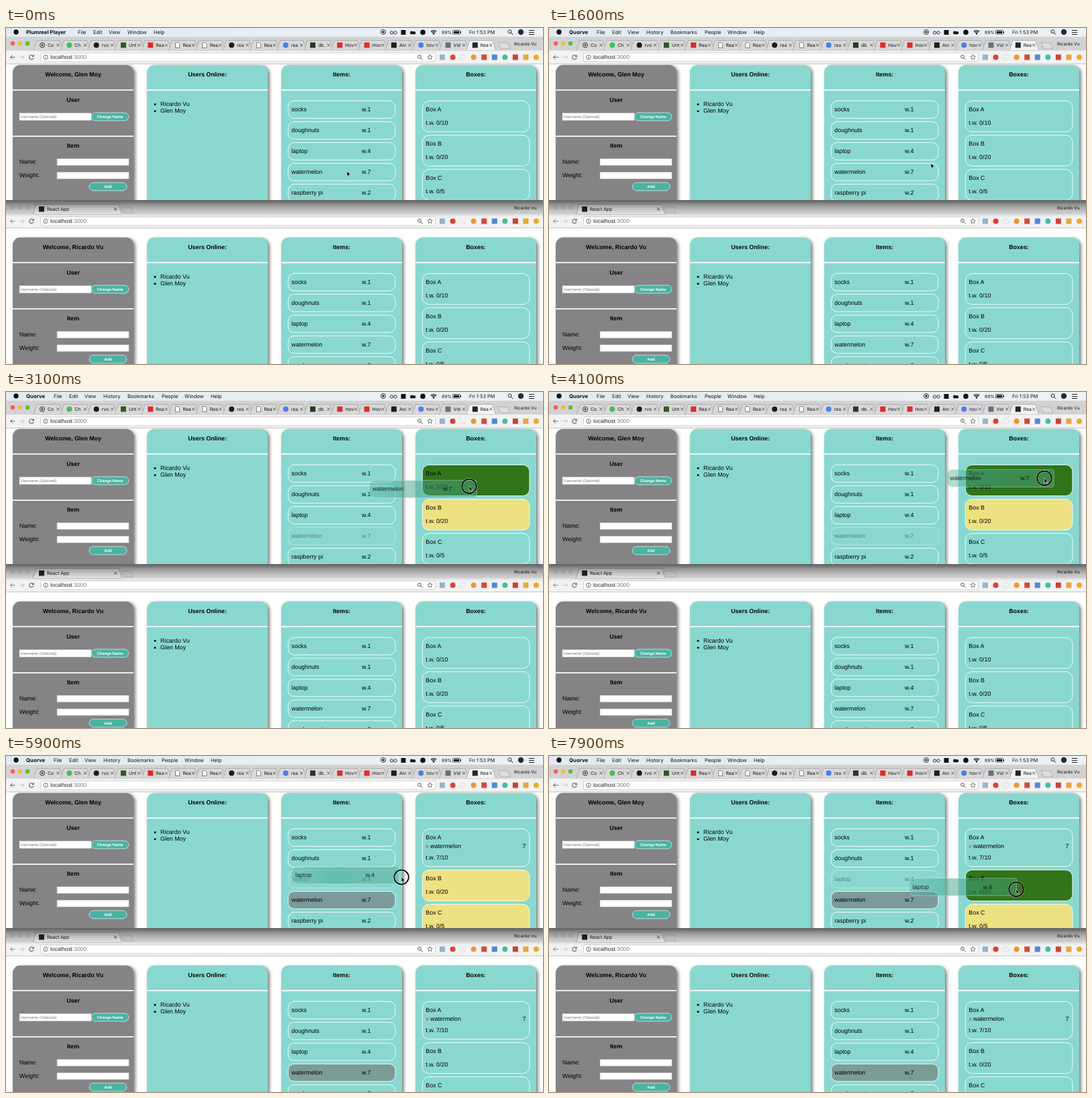
An HTML page with a canvas for the animation above (8000 ms loop, 800 by 500 pixels).

```html
<!DOCTYPE html>
<html lang="en">
<head>
<meta charset="utf-8">
<title>Boxes</title>
<style>
html, body { margin: 0; width: 100%; height: 100%; overflow: hidden; background: #fff; }
canvas { display: block; width: 800px; height: 500px; }
</style>
</head>
<body>
<canvas id="stage" width="800" height="500"></canvas>
<script>
const ctx = document.getElementById('stage').getContext('2d');
const LOOP = 8000;
const MENU_AT = 500;
const SANS = '"Liberation Sans", Arial, sans-serif';
const UI = 'Inter, Roboto, sans-serif';
const TEAL = '#89d8cf', GREY = '#858385', BUTTON = '#4bb3a4';
const YELLOW = '#ede181', GREEN = '#31741a', PACKED = '#7b9b98';
const ME = 'Glen Moy', OTHER = 'Ricardo Vu';
const items = [['socks', 1], ['doughnuts', 1], ['laptop', 4], ['watermelon', 7], ['raspberry pi', 2]];
const boxes = [['Box A', 10], ['Box B', 20], ['Box C', 5]];

// time, pointer x, y, dragged card offset x, y
const path = [
  [0, 508, 213, 0, 0], [700, 508, 213, 0, 0], [1600, 569, 201, 0, 0],
  [1850, 570, 211, 0, 0], [2500, 640, 156, 70, -54], [3100, 690, 140, 121, -70],
  [4100, 738, 128, 172, -86], [4700, 735, 130, 169, -84], [5500, 582, 187, 0, 0],
  [5700, 583, 187, 0, 0], [5900, 589, 180, 5.5, -6], [6500, 655, 196, 74, 9],
  [7000, 685, 202, 105.5, 15], [7900, 696, 198, 116.5, 11.5], [8000, 697, 198, 117.5, 11.5]
];
const drags = [{ item: 3, from: 1850, to: 4700 }, { item: 2, from: 5720, to: 8001 }];

function poseAt(t) {
  let i = 0;
  while (i < path.length - 2 && t >= path[i + 1][0]) i++;
  const a = path[i], b = path[i + 1];
  const k = (t - a[0]) / (b[0] - a[0]);
  const [x, y, dx, dy] = a.slice(1).map((v, n) => v + (b[n + 1] - v) * k);
  return { x, y, dx, dy };
}

// y is the middle of the line
function text(s, x, y, size = 8.89, color = '#000', o = {}) {
  ctx.font = `${o.weight || 400} ${size}px ${o.font || SANS}`;
  ctx.textRendering = 'geometricPrecision';
  ctx.textAlign = o.align || 'left';
  ctx.fillStyle = color;
  ctx.fillText(s, x, y + size * 0.35);
}
const bold = (s, x, y) => text(s, x, y, 8.89, '#000', { weight: 700, align: 'center' });
const ui = (s, x, y, size, weight = 400) => text(s, x, y, size, '#111', { font: UI, weight });

function rect(x, y, w, h, color) {
  ctx.fillStyle = color;
  ctx.fillRect(x, y, w, h);
}
function round(x, y, w, h, r, fill, stroke, width = 1) {
  ctx.beginPath();
  ctx.roundRect(x, y, w, h, r);
  if (fill) { ctx.fillStyle = fill; ctx.fill(); }
  if (stroke) { ctx.strokeStyle = stroke; ctx.lineWidth = width; ctx.stroke(); }
}
function dot(x, y, r, fill, stroke, width = 1) {
  ctx.beginPath();
  ctx.arc(x, y, r, 0, Math.PI * 2);
  if (fill) { ctx.fillStyle = fill; ctx.fill(); }
  if (stroke) { ctx.strokeStyle = stroke; ctx.lineWidth = width; ctx.stroke(); }
}
function poly(pts, fill, stroke, width = 1, close = true) {
  ctx.beginPath();
  pts.forEach(([x, y], i) => i ? ctx.lineTo(x, y) : ctx.moveTo(x, y));
  if (close) ctx.closePath();
  if (fill) { ctx.fillStyle = fill; ctx.fill(); }
  if (stroke) { ctx.strokeStyle = stroke; ctx.lineWidth = width; ctx.stroke(); }
}
const line = (pts, color, width = 1) => poly(pts, null, color, width, false);

function arc(x, y, r, a, b, color, width) {
  ctx.beginPath();
  ctx.arc(x, y, r, a, b);
  ctx.strokeStyle = color;
  ctx.lineWidth = width;
  ctx.stroke();
}
function gradient(x0, y0, x1, y1, stops) {
  const g = ctx.createLinearGradient(x0, y0, x1, y1);
  stops.forEach(([at, color]) => g.addColorStop(at, color));
  return g;
}
function cross(x, y, r = 2, color = '#444') {
  line([[x - r, y - r], [x + r, y + r]], color, 0.9);
  line([[x + r, y - r], [x - r, y + r]], color, 0.9);
}
function lens(x, y, r, color, width) {
  dot(x, y, r, null, color, width);
  line([[x + r * 0.7, y + r * 0.7], [x + r * 2, y + r * 2]], color, width);
}

function menuBar(t) {
  rect(0, 0, 800, 13, gradient(0, 0, 800, 0, [[0, '#e1eaf2'], [1, '#ecf1f5']]));
  dot(15, 6, 3.7, '#111');
  const early = t < MENU_AT;
  const labels = early
    ? [['File', 107], ['Edit', 130], ['View', 153], ['Window', 181], ['Help', 220]]
    : [['File', 71], ['Edit', 94], ['View', 117], ['History', 145], ['Bookmarks', 181],
       ['People', 232], ['Window', 266], ['Help', 305]];
  ui(early ? 'Plumreel Player' : 'Quorve', 30, 6.3, 7.8, 700);
  labels.forEach(([s, x]) => ui(s, x, 6.3, 7.5));

  dot(562, 6, 3.6, null, '#222', 0.9);
  rect(560.5, 4.5, 3, 3, '#222');
  dot(574.5, 7, 2.2, null, '#222', 0.9);
  dot(580, 7, 2.2, null, '#222', 0.9);
  rect(588.5, 3, 7, 7, '#111');
  dot(604.5, 7, 2.5, '#111');
  dot(608, 7.3, 2.2, '#111');
  dot(621, 6.4, 3.8, '#111');
  [2, 4, 6].forEach(r => arc(637, 9.5, r, -2.35, -0.79, '#111', 1.2));
  dot(637, 9.2, 0.9, '#111');
  ui('89%', 649, 6.3, 6.7);
  round(665.5, 3.5, 11, 5.5, 1, null, '#222', 0.8);
  rect(667, 4.8, 8, 3, '#111');
  rect(677, 5, 1, 2.5, '#111');
  ui('Fri 1:53 PM', 690, 6.3, 7.4);
  lens(750.5, 5.3, 2.5, '#222', 1);
  dot(767, 6, 4.2, '#26283f');
  [3, 6, 9].forEach(y => rect(779, y, 8, 1, '#222'));
}

function tabShape(x, w, y, fill) {
  poly([[x, y + 15], [x + 5, y], [x + w - 5, y], [x + w, y + 15]], fill, '#a5a5a5', 0.8);
}
function favicon(kind, x, y) {
  if (kind === 'page') {
    poly([[x - 3, y - 4], [x + 1, y - 4], [x + 3, y - 2], [x + 3, y + 4], [x - 3, y + 4]], '#fff', '#666', 0.8);
  } else if (kind === 'add') {
    dot(x, y, 3.6, null, '#222', 0.9);
    line([[x - 2, y], [x + 2, y]], '#222', 0.9);
    line([[x, y - 2], [x, y + 2]], '#222', 0.9);
  } else if (kind[0] === 'o') {
    dot(x, y, 4, kind.slice(1));
  } else {
    rect(x - 4, y - 4, 8, 8, kind);
  }
}
const tabs = [
  ['Co', 'add'], ['Ch', 'o#3fbf50'], ['rvo', 'o#1b1b1b'], ['Unt', '#2d5a20'], ['Rea', '#dd2c28'],
  ['Rea', 'page'], ['Rea', 'page'], ['rea', 'o#1b1b1b'], ['Rea', 'page'], ['rea', 'o#4a7fe8'],
  ['db.', '#263a20'], ['Hov', '#dd2c28'], ['Hov', '#dd2c28'], ['Ani', '#1d1d1d'], ['hov', 'o#4a7fe8'],
  ['Vid', '#5f7381'], ['Rea', '#20262b']
];
const addons = ['#8fb4cf', 'o#df3d35', '', 'o#e79834', '#d5483c', '#5287d6', 'o#43bda4', '#c94236', '#e9a53a', 'o#f0a62c'];

function toolbar(y, focused) {
  rect(0, y - 10, 800, 20, '#f2f2f2');
  rect(0, y + 9.5, 800, 0.8, '#b9b9b9');
  const dark = '#606060', pale = '#c2c2c2';
  const arrow = (x, d, c) => {
    line([[x - 3.5, y], [x + 3.5, y]], c, 1);
    line([[x + d * 0.5, y - 3], [x + d * 3.5, y], [x + d * 0.5, y + 3]], c, 1);
  };
  arrow(10, -1, focused ? dark : '#888');
  arrow(24, 1, pale);
  arc(38, y, 3.2, 0.3, 5.4, dark, 1.1);
  poly([[41.7, y - 4], [41.7, y - 0.5], [38.3, y - 0.5]], dark);
  round(51.5, y - 6.5, 588, 13, 2, '#fff', '#c4c4c4', 0.8);
  dot(59, y, 3.3, null, '#555', 0.8);
  rect(58.5, y - 0.5, 1, 2.3, '#555');
  rect(58.5, y - 2, 1, 1, '#555');
  text('localhost', 66, y, 8.35, '#222');
  text(':3000', 99, y, 8.35, '#777');
  lens(616, y - 0.8, 2.4, '#555', 1);
  const star = Array.from({ length: 10 }, (_, i) => {
    const a = i * Math.PI / 5 - Math.PI / 2, r = i % 2 ? 1.8 : 4;
    return [631.5 + r * Math.cos(a), y + r * Math.sin(a)];
  });
  poly(star, null, '#555', 0.8);
  addons.forEach((kind, i) => {
    const x = 650 + i * 15.55;
    if (kind) favicon(kind, x, y);
    else round(x - 4, y - 3, 8, 6, 1, null, '#dedede', 0.8);
  });
}

function browserTop() {
  rect(0, 13, 800, 21, '#d3d2d3');
  ['#fc5b57', '#e5bf3c', '#57c038'].forEach((c, i) => dot(10 + i * 11, 23, 3.2, c));
  tabs.forEach(([label, icon], i) => {
    const x = 54 + i * 40.3;
    tabShape(x - 13, 44, 18.5, i === tabs.length - 1 ? '#f2f2f2' : '#d9d8d9');
    favicon(icon, x, 25.5);
    ui(label, x + 8, 25.5, 6.8);
    cross(x + 23.5, 25.5);
  });
  poly([[733, 22], [747, 22], [751, 31], [737, 31]], '#dedede', '#a9a9a9', 0.8);
  ui(OTHER, 757, 23.5, 6.5);
  toolbar(43.5, true);
}
function lowerTop() {
  rect(0, 257, 800, 21, '#e4e4e4');
  [10, 21, 32].forEach(x => dot(x, 267, 3.2, '#d5d5d5', '#c8c8c8', 0.6));
  tabShape(40, 133, 262.5, '#f5f5f5');
  favicon('#20262b', 53, 269.5);
  ui('React App', 61, 269.5, 6.8);
  cross(163, 269.5);
  poly([[172, 266], [186, 266], [190, 275], [176, 275]], '#e2e2e2', '#b9b9b9', 0.8);
  ui(OTHER, 757, 267.5, 6.5);
  toolbar(287.5, false);
  // shadow of the window in front
  const shade = [[0, 0.6], [0.3, 0.33], [0.6, 0.16], [1, 0]].map(([at, a]) => [at, `rgba(0,0,0,${a})`]);
  rect(0, 256, 800, 26, gradient(0, 256, 0, 282, shade));
}

function column(x, title, color) {
  ctx.save();
  ctx.shadowColor = 'rgba(0,0,0,.55)';
  ctx.shadowBlur = 5;
  ctx.shadowOffsetX = 2.5;
  ctx.shadowOffsetY = 2;
  round(x, 55, 180, 300, [11, 11, 0, 0], color);
  ctx.restore();
  rect(x, 91.5, 180, 1.7, '#fff');
  bold(title, x + 90, 69);
}
function field(x, y, w, h) {
  rect(x, y, w, h, '#fff');
  ctx.strokeStyle = '#bbb';
  ctx.lineWidth = 0.6;
  ctx.strokeRect(x, y, w, h);
}
function button(x, y, w, label) {
  round(x, y, w, 12, 6, BUTTON, '#d5ece8', 0.8);
  text(label, x + w / 2, y + 6, 5.8, '#fff', { weight: 700, align: 'center' });
}
function form(name) {
  column(10, 'Welcome, ' + name, GREY);
  bold('User', 100, 107);
  field(20, 126.5, 107, 11);
  text('Username (Optional)', 21.5, 132, 5.8, '#777');
  button(127.3, 126, 55.5, 'Change Name');
  rect(10, 160.2, 180, 1.7, '#fff');
  bold('Item', 100, 175);
  text('Name:', 20, 199);
  field(76, 194.5, 107, 10);
  text('Weight:', 20, 219);
  field(76, 214.5, 107, 10);
  button(124, 230, 56, 'Add');
}
function itemCard(y, [name, weight], fill, alpha) {
  ctx.globalAlpha = alpha;
  round(420.3, y, 159.6, 26, 9, fill, '#f4fffd', 0.9);
  text(name, 425.3, y + 12.7);
  text('w.' + weight, 530, y + 12.7);
  ctx.globalAlpha = 1;
}
const itemTop = i => 108.4 + i * 31;
const boxTop = (i, packed) => 108.5 + i * 50.9 + (packed && i ? 10.3 : 0);
const boxHeight = (i, packed) => packed && !i ? 56 : 46;

function page(name, packed, drag, pose) {
  form(name);
  column(210, 'Users Online:', TEAL);
  [OTHER, ME].forEach((user, i) => {
    dot(222, 113.5 + i * 10.2, 1.5, '#000');
    text(user, 230, 113 + i * 10.2);
  });
  column(410, 'Items:', TEAL);
  items.forEach((item, i) => {
    const lifted = drag && drag.item === i;
    itemCard(itemTop(i), item, packed && i === 3 ? PACKED : null, lifted ? 0.4 : 1);
  });
  column(610, 'Boxes:', TEAL);
  const inside = i => {
    const top = boxTop(i, packed);
    return pose.x > 620 && pose.x < 780 && pose.y > top - 4 && pose.y < top + boxHeight(i, packed);
  };
  boxes.forEach(([label, limit], i) => {
    const y = boxTop(i, packed), h = boxHeight(i, packed);
    const load = packed && !i ? 7 : 0;
    const fits = drag && load + items[drag.item][1] <= limit;
    round(620.3, y, 159.6, h, 10, fits ? (inside(i) ? GREEN : YELLOW) : null, '#f4fffd', 0.9);
    text(label, 625.3, y + 12.5);
    if (load) {
      text('x', 625.3, y + 25.2, 8.89, '#d93a32');
      text('watermelon', 632, y + 25.2);
      text('7', 769.5, y + 25.2);
    }
    text(`t.w. ${load}/${limit}`, 625.3, y + h - 13.5);
  });
}

function ghost(drag, pose) {
  const [name, weight] = items[drag.item];
  const x = 420 + pose.dx, y = itemTop(drag.item) + pose.dy;
  const fill = gradient(x, 0, x + 160, 0, [
    [0, 'rgba(90,180,162,.45)'], [0.4, 'rgba(70,165,142,.52)'], [1, 'rgba(75,165,135,.42)']
  ]);
  round(x, y, 160, 26, [9, 2, 2, 9], fill, 'rgba(225,250,246,.45)', 0.8);
  text(name, x + 5.3, y + 12.7, 8.89, 'rgba(0,0,0,.82)');
  text('w.' + weight, x + 110, y + 12.7, 8.89, 'rgba(0,0,0,.82)');
}
function pointer({ x, y }, pressed) {
  if (pressed) {
    dot(x, y + 0.3, 10.7, null, 'rgba(255,255,255,.5)', 3);
    dot(x, y + 0.3, 10.7, null, '#0b0b0b', 1.8);
  }
  const shape = [[0, 0], [0, 7.5], [1.8, 6], [3, 8.6], [4.2, 8], [3.1, 5.5], [5.3, 5.3]];
  poly(shape.map(([a, b]) => [x + a, y + b]), '#000', '#fff', 0.6);
}
function clipped(y, h, paint) {
  ctx.save();
  ctx.beginPath();
  ctx.rect(0, y, 800, h);
  ctx.clip();
  paint();
  ctx.restore();
}

function draw(t) {
  const pose = poseAt(t);
  const drag = drags.find(d => t >= d.from && t < d.to);
  const packed = t >= drags[0].to;
  rect(0, 0, 800, 500, '#fff');
  clipped(53, 203, () => page(ME, packed, drag, pose));
  clipped(297, 203, () => {
    ctx.translate(0, 256.8);
    page(OTHER, packed, null, pose);
  });
  browserTop();
  lowerTop();
  menuBar(t);
  if (drag) ghost(drag, pose);
  pointer(pose, !!drag);
}

const start = performance.now();
function tick() {
  draw((performance.now() - start) % LOOP);
  requestAnimationFrame(tick);
}
tick();
</script>
</body>
</html>
```
